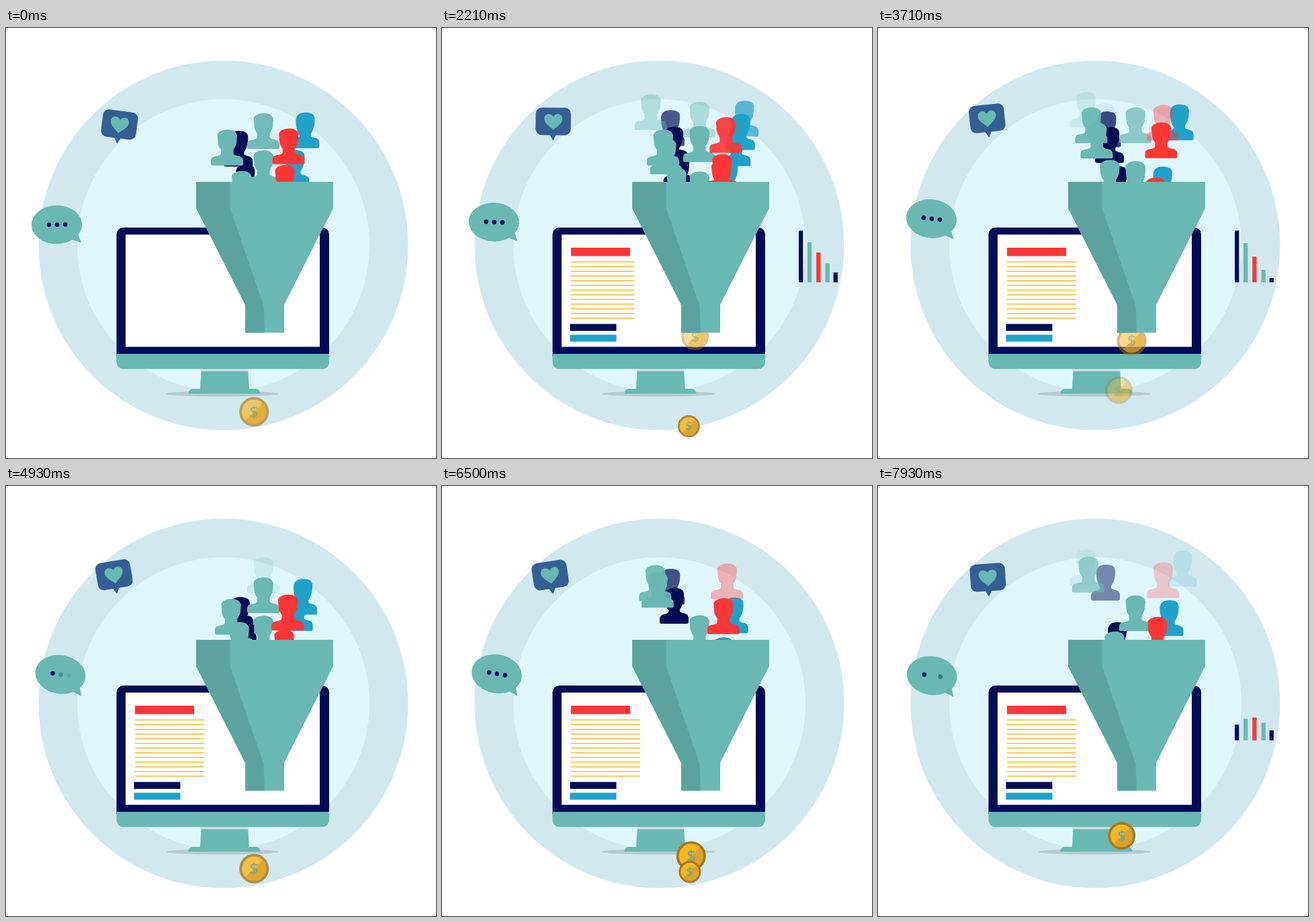
These frames come from a looping animation (640 by 640 pixels, 8000 ms). An HTML page with a canvas:

```html
<!DOCTYPE html>
<html lang="en">
<head>
<meta charset="utf-8">
<title>Audience funnel</title>
<style>
  html, body { margin: 0; width: 100%; height: 100%; overflow: hidden; background: #fff; }
  canvas { display: block; width: 640px; height: 640px; }
</style>
</head>
<body>
<canvas id="stage" width="640" height="640"></canvas>
<script>
const LOOP = 8000;
const TEAL = '#69b8b3', DARK_TEAL = '#5ca3a0', NAVY = '#000c55', RED = '#ff3636',
      BLUE = '#1fa2c9', GOLD = '#fdb61d';
const c = document.getElementById('stage').getContext('2d');

const clamp = v => Math.min(1, Math.max(0, v));
const mix = (a, b, p) => a + (b - a) * p;
const smooth = u => (1 - Math.cos(Math.PI * clamp(u))) / 2;
const easeOut = u => 1 - (1 - clamp(u)) ** 2;
const sway = (t, start, half) => (1 - Math.cos(Math.PI * (t - start) / half)) / 2;

function fill(color, shape) {
  c.fillStyle = color;
  c.fill(shape instanceof Path2D ? shape : new Path2D(shape));
}
function rect(color, x, y, w, h) {
  c.fillStyle = color;
  c.fillRect(x, y, w, h);
}
function ellipse(color, x, y, rx, ry = rx) {
  c.fillStyle = color;
  c.beginPath();
  c.ellipse(x, y, rx, ry, 0, 0, 7);
  c.fill();
}
function rounded(color, x, y, w, h, radii) {
  c.fillStyle = color;
  c.beginPath();
  c.roundRect(x, y, w, h, radii);
  c.fill();
}
function at(x, y, degrees, draw) {
  c.save();
  c.translate(x, y);
  c.rotate(degrees * Math.PI / 180);
  draw();
  c.restore();
}

// Busts: origin at the top centre of the head.
const shortHair = new Path2D('M-14.5 8C-14 3-6 0 1 0C8 0 14 3 15 9L14 20C13 25 11 27 9.5 30V35C10 38 13 38.500 18 39.500Q24 41 24 47V51Q24 53.300 22 53.300H-22Q-24 53.300-24 51V46Q-24 41-18 40C-12 39-9 38-9 35V30C-11 27-13 25-13.500 20Z');
const bobHair = new Path2D('M-13.500 13C-14 4-8 0 0 0C8 0 14 2 14.500 8C15 17 13 25 9 31C8 35 9 36 12 37C18 38 21.500 40 21.500 45V51Q21.500 53.300 19 53.300H-19Q-21.500 53.300-21.500 51V46Q-21.500 41-16 39.500C-10 38-8 37-8 34C-11 30-13.500 22-13.500 13Z');

// Each fall: start time in ms, or [start, own speed].
const crowds = [
  { color: NAVY, shape: bobHair, x: 337.500, y: 112, drift: .2, speed: 56,
    falls: [-1925, -1030, 482, 680, 1285, 1740, 2780, 3200, 3680, 5490, 6010, 7600] },
  { color: TEAL, shape: shortHair, x: 309, y: 94, drift: .35, speed: 69,
    falls: [-2020, -1130, 260, 890, 1080, 1930, 2730, 3060, 3560, 5710, 5855, 7490, 7830] },
  { color: TEAL, shape: shortHair, x: 383, y: 105, drift: 0, speed: 62,
    falls: [-1540, -650, 160, [800, 37], 1910, 3210, 4130, 4790, 6700] },
  { color: BLUE, shape: bobHair, x: 453, y: 96, drift: -.27, speed: 66,
    falls: [-1600, -750, 380, [740, 48], 1425, 1740, [2970, 40], 3990, 5140, 6510, 7830] },
  { color: RED, shape: shortHair, x: 424.500, y: 112, drift: -.104, speed: 60,
    falls: [-1830, -925, 487, 650, 1570, 2935, [3450, 42], 5283, 6250, 7760] }
];

function people(t) {
  const ramp = .6;
  for (const { color, shape, x, y, drift, speed, falls } of crowds) {
    for (const fall of falls) {
      const [start, pace] = Array.isArray(fall) ? fall : [fall, speed];
      const age = (t - start) / 1000;
      if (age <= 0) continue;
      const drop = pace * (age < ramp ? age * age / (2 * ramp) : age - ramp / 2);
      if (y + drop > 240) continue;
      c.globalAlpha = clamp(age / .7);
      at(x + drift * drop, y + drop, 0, () => fill(color, shape));
    }
  }
  c.globalAlpha = 1;
}

const coinKinds = {
  large: { r: 22, x: 369, y: 573 },
  medium: { r: 20.5, x: 358.5, y: 539 },
  small: { r: 16.5, x: 367, y: 598 }
};
const coinDrops = [
  ['large', -1410], ['small', 910], ['medium', 2120], ['large', 3600],
  ['large', 5580], ['small', 5540], ['medium', 7055]
];

function coin(r) {
  c.scale(r / 22, r / 22);
  ellipse(GOLD, 0, 0, 18);
  c.fillStyle = '#dfa126';
  c.beginPath();
  c.arc(0, 0, 18, -Math.PI / 4, Math.PI * 3 / 4);
  c.fill();
  c.strokeStyle = '#a67a1b';
  c.lineWidth = 4;
  c.beginPath();
  c.arc(0, 0, 20, 0, 7);
  c.stroke();
  c.fillStyle = '#69aaa0';
  c.font = '600 24px "Open Sans", sans-serif';
  c.textAlign = 'center';
  c.textBaseline = 'alphabetic';
  c.fillText('$', 0, 8.5);
}

function coins(t) {
  for (const [kind, start] of coinDrops) {
    const { r, x, y } = coinKinds[kind];
    const u = (t - start) / 1600;
    if (u <= 0 || u >= 1.1) continue;
    const p = easeOut(u);
    c.globalAlpha = clamp(u / .13) * clamp((1.1 - u) / .33);
    at(mix(379, x, p), mix(449, y, p), 0, () => coin(r));
  }
  c.globalAlpha = 1;
}

function backdrop() {
  rect('#fff', 0, 0, 640, 640);
  ellipse('#d1e8ee', 323.5, 323.5, 275);
  ellipse('#dff6fd', 323.5, 323.5, 217.5);
}

function monitor(t) {
  ellipse('#b7cbd1', 322, 544.5, 84.5, 4);
  fill(TEAL, 'M291 507H360L362 541H288.500Z');
  rect('#d9dde0', 291, 507, 69, 3.7);
  fill(TEAL, 'M271.500 544.300Q272 537 279 537H371Q378 537 378.500 544.300Z');
  rounded(NAVY, 164.5, 297, 316.5, 192, [10, 10, 0, 0]);
  rounded(TEAL, 164.5, 485, 316.5, 22.5, [0, 0, 10, 10]);
  rect('#fff', 178, 307.5, 289, 167);

  rect(RED, 192, 327, 88 * smooth((t - 524) / 867), 12.5);
  const lineWidth = 103 * smooth((t - 830) / 1700);
  for (let i = 0; i < 13; i++) rect('#fcb92f', 192, 347.5 + i * 6.97, lineWidth, 1.5);
  rect(NAVY, 190.5, 440.5, 69 * smooth((t - 423) / 867), 10.3);
  rect(BLUE, 190.5, 456.5, 69 * smooth((t - 615) / 867), 10.3);
}

function funnel() {
  fill(TEAL, 'M283 229H487V268L414 412V453.500H356V412L283 268Z');
  fill(DARK_TEAL, 'M283 229H333.500V268L383.500 414L385 453.500H356V412L283 268Z');
}

const bars = [[531, 77, NAVY], [544, 59.5, TEAL], [557.2, 44.3, RED], [570.5, 28, TEAL], [582.6, 14.8, NAVY]];

function chart(t) {
  bars.forEach(([x, full, color], i) => {
    const delay = 133 * (4 - i);
    const step = start => smooth((t - start - delay) / 867);
    const h = full * (step(147) - step(3235) + step(7077));
    rect(color, x, 378.5 - h, 6.3, h);
  });
}

function likeBadge(t) {
  const p = sway(t, -350, 5900);
  at(mix(169, 160.5, p), mix(143.8, 131.8, p), mix(7.6, -9.8, p), () => {
    rounded('#345f94', -26.2, -20.4, 52.4, 40.8, 9);
    fill('#345f94', 'M-5 20H4.500L0 28.500Z');
    fill(TEAL, 'M0 12.800C-5 8-13.500 3-13.500-4C-13.500-12-4-13.500 0-7C4-13.500 13.500-12 13.500-4C13.500 3 5 8 0 12.800Z');
  });
}

// Per dot, within its cycle: fade-out start, fade-in start.
const dots = [[650, 920], [850, 1460], [980, 1505]];

function chatBubble(t) {
  const p = sway(t, 0, 6100);
  const phase = t % 3400;
  at(mix(75.5, 81.5, p), mix(292.7, 279.4, p), mix(-.8, 9.8, p), () => {
    ellipse(TEAL, 0, 0, 37.6, 28.8);
    fill(TEAL, 'M21 22L31 13L36 27Z');
    dots.forEach(([out, back], i) => {
      c.globalAlpha = 1 - clamp((phase - out) / 250) + clamp((phase - back) / 250);
      ellipse(NAVY, -11.6 + 12.1 * i, 0, 3.3);
    });
    c.globalAlpha = 1;
  });
}

function frame(now) {
  const t = now % LOOP;
  backdrop();
  monitor(t);
  coins(t);
  people(t);
  funnel();
  chart(t);
  likeBadge(t);
  chatBubble(t);
}

const begin = performance.now();
function tick() {
  frame(performance.now() - begin);
  requestAnimationFrame(tick);
}
tick();
</script>
</body>
</html>
```
